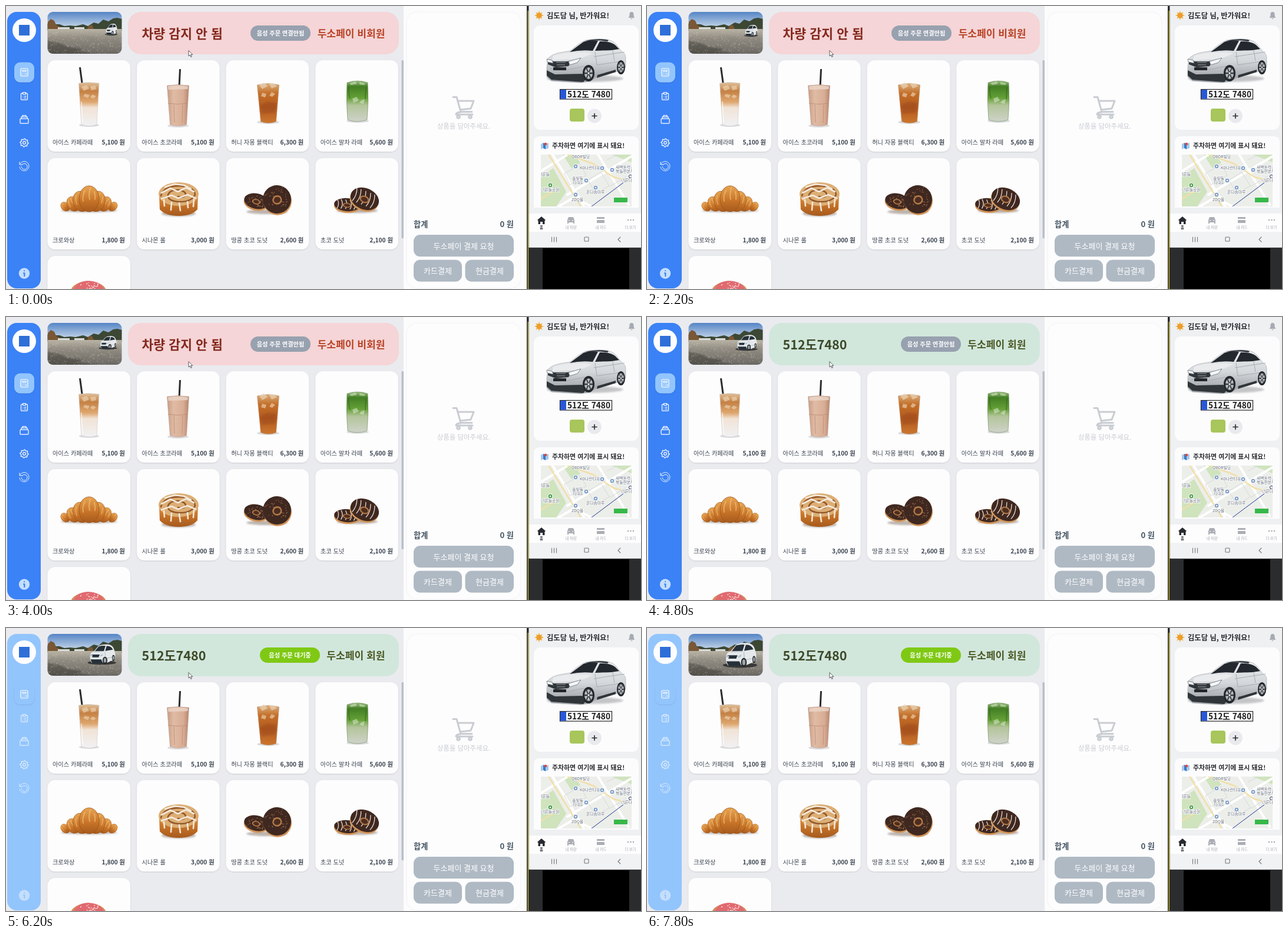
Write an HTML page that moves like this. It is 1078 px wide and 480 px high and loops after 8 s.

```html
<!DOCTYPE html>
<html lang="ko">
<head>
<meta charset="utf-8">
<title>주문 화면</title>
<style>
html, body { margin: 0; width: 100%; height: 100%; overflow: hidden; background: #eaebef; }
svg { display: block; width: 100%; height: 100%; }
text { font-family: "Noto Sans CJK KR", "Noto Sans CJK", sans-serif; white-space: pre; }
.b { font-weight: 700; }
.m { font-weight: 500; }
.mid { text-anchor: middle; }
.end { text-anchor: end; }
.line { fill: none; stroke-linecap: round; stroke-linejoin: round; }
</style>
</head>
<body>
<svg viewBox="0 0 1078 480">
<defs>
  <filter id="shadow" x="-20%" y="-20%" width="140%" height="140%"><feDropShadow dx="0" dy="1" stdDeviation="1" flood-opacity=".13"/></filter>
  <filter id="soft"><feGaussianBlur stdDeviation="1.5"/></filter>
  <linearGradient id="sky" x2="0" y2="1"><stop stop-color="#5585c6"/><stop offset="1" stop-color="#d3e0ec"/></linearGradient>
  <linearGradient id="ground" x2="0" y2="1"><stop stop-color="#bab4a6"/><stop offset=".35" stop-color="#918c82"/><stop offset="1" stop-color="#6a6762"/></linearGradient>
  <linearGradient id="latte" x2="0" y2="1"><stop stop-color="#dfc09b"/><stop offset=".2" stop-color="#c58144"/><stop offset=".45" stop-color="#dea76f"/><stop offset=".58" stop-color="#f1e3d6"/><stop offset="1" stop-color="#f1f1f4"/></linearGradient>
  <linearGradient id="choco"><stop stop-color="#c69c86"/><stop offset=".3" stop-color="#e0bba4"/><stop offset=".75" stop-color="#d8ad95"/><stop offset="1" stop-color="#b4846c"/></linearGradient>
  <linearGradient id="tea" x2="0" y2="1"><stop stop-color="#d9ab7b"/><stop offset=".25" stop-color="#c4702a"/><stop offset=".6" stop-color="#b4591e"/><stop offset="1" stop-color="#cb762e"/></linearGradient>
  <linearGradient id="matcha" x2="0" y2="1"><stop stop-color="#9cbf80"/><stop offset=".14" stop-color="#437f25"/><stop offset=".42" stop-color="#64a036"/><stop offset=".6" stop-color="#b3c49a"/><stop offset="1" stop-color="#cfd3ca"/></linearGradient>
  <linearGradient id="crust" x2="0" y2="1"><stop stop-color="#e7a552"/><stop offset=".55" stop-color="#c97529"/><stop offset="1" stop-color="#a65a1d"/></linearGradient>
  <linearGradient id="metal" x2="0" y2="1"><stop stop-color="#e9ebed"/><stop offset=".5" stop-color="#d5d8db"/><stop offset="1" stop-color="#92979d"/></linearGradient>
  <clipPath id="photoClip"><rect x="70.5" y="10" width="126" height="71" rx="9"/></clipPath>
  <clipPath id="mapClip"><rect x="908" y="252" width="154" height="88"/></clipPath>
</defs>

<!-- Sidebar -->
<rect id="sidebar" x="2" y="10" width="57" height="469" rx="16"/>
<circle cx="31" cy="41" r="20" fill="#fdfdfe"/>
<rect x="22" y="32" width="18" height="18" fill="#2f6fd8"/>
<rect x="14" y="95.500" width="34" height="34" rx="10" fill="#93c5fd" filter="url(#shadow)"/>
<g class="line" stroke="#fff" stroke-width="1.2">
  <path d="M26.500 106h9q1.500 0 1.500 1.500v10q0 1.500-1.500 1.500h-9q-1.500 0-1.500-1.500v-10q0-1.500 1.500-1.500M28 109h6v2h-6z"/>
  <path d="M28 114h.1M31 114h.1M34 114h.1M28 116.500h.1M31 116.500h.1M34 114v2.500"/>
</g>
<g id="icons" class="line" stroke="#fff" stroke-width="1.25">
  <path d="M28 148h-1.500q-1 0-1 1v9q0 1 1 1h9q1 0 1-1v-9q0-1-1-1H34M28.500 146.500h5v3h-5zM28.500 153h.1M31 153h3M28.500 156h.1M31 156h3"/>
  <path d="M25 191h12q1 0 1 1v6q0 1-1 1H25q-1 0-1-1v-6q0-1 1-1M26 191v-3h10v3M28 188v-2.500h6v2.500"/>
  <path id="gear"/><circle cx="31" cy="232" r="2.300"/>
  <path stroke-width=".9" d="M23 264.500v4.500h4.500M23.500 268.500a8 8 0 1 1-.5 4.500M27 269.500a5 5 0 1 1-.8 3"/>
</g>
<circle cx="31" cy="453.500" r="9.200" fill="#c5defc"/>
<path id="info" class="line" stroke-width="2.200" d="M31 449h.1M30 453h1.300v5"/>

<!-- Camera view -->
<g clip-path="url(#photoClip)">
  <path fill="url(#sky)" d="M70 10h127v30H70z"/>
  <path fill="#3c4734" d="M70 30l5-3 7 4 9 0 8 3 10-1 9 1 13-3 8 3 10-6 8 2 8-7 9 3 8-5 7-1 8 2v20H70z"/>
  <path fill="#7a5735" d="M71 39V27l5-5 6 3 3 7 6 3v5zM138 39l2-6 6-1 3 7z"/>
  <path fill="#d9dcda" d="M88 36h20v3H88zM116 36h17v3h-17z"/>
  <path fill="url(#ground)" d="M70 39h127v43H70z"/>
  <path fill="#34342f" opacity=".45" filter="url(#soft)" d="M70 59l24 5 9 5 28 4-10 4 38 6H70z"/>
  <path id="gravel" class="line" stroke="#d6cebd" stroke-width=".8" opacity=".55"/>
  <g id="car">
    <ellipse cx="48" cy="91" rx="54" ry="10" fill="#242526" opacity=".8"/>
    <path fill="#e6e9eb" d="M4 55q2-13 14-17l16-24q11-10 38-9 18 3 23 25l4 20-1 25-10 5-18 10-60 2-6-12z"/>
    <path fill="#263039" d="M22 37l14-22q14-5 26-3l-6 24zM61 36l5-23q16-3 24 17zM8 53h32l-4 13H12zM5 76h41l6 17H12z"/>
    <path fill="#b5c7d2" d="M4 52l9 3 1 8-9-3zM42 55l12-6-3 10-10 4z"/>
    <path fill="none" stroke="#aab2b8" stroke-width="2" d="M18 40l38-2M60 40l2 32 28-8"/>
    <g fill="#22272b"><ellipse cx="60" cy="80" rx="9" ry="17"/><ellipse cx="92" cy="69" rx="5" ry="14"/></g>
    <g fill="#9da5aa"><ellipse cx="60" cy="80" rx="5" ry="11"/><ellipse cx="92" cy="69" rx="3" ry="9"/></g>
  </g>
</g>

<!-- Status banner -->
<rect id="banner" x="207" y="10" width="460" height="72" rx="22"/>
<text id="plate" class="b" x="230.500" y="54.500" font-size="21.600"/>
<rect id="pill" y="33" width="102" height="26" rx="13"/>
<text id="voice" class="b mid" y="50" font-size="10.200" fill="#fff"/>
<text id="member" class="b end" x="643.500" y="53" font-size="17.100"/>

<g id="cards"></g>
<rect x="671.500" y="92" width="3.500" height="302" rx="1" fill="#b9bfc8"/>

<!-- Drinks -->
<g>
  <g fill="#c8c8cc" opacity=".65"><ellipse cx="141" cy="202" rx="17" ry="3"/><ellipse cx="292" cy="203" rx="18" ry="3"/><ellipse cx="445" cy="197" rx="19" ry="3"/><ellipse cx="597" cy="195" rx="19" ry="3"/></g>
  <path fill="none" stroke="#2b2a2c" stroke-width="3" d="M125.500 104l4.500 33M295.500 107l-1.500 30"/>
  <path fill="url(#latte)" stroke="#cfcac6" stroke-width=".6" d="M123.500 131q17-3 34.500 0l-4 70q-13 5-26 0z"/>
  <path fill="#efd8bb" opacity=".6" d="M128 137l9-3 4 6-9 4zM143 136l9-1 1 6-8 2zM134 149l8 2-3 5-8-3zM147 150l6 3-5 4-5-3z"/>
  <path fill="none" stroke="#fff" stroke-width="1.500" opacity=".7" d="M128 162l2 36"/>
  <path fill="url(#choco)" stroke="#c0a093" stroke-width=".6" d="M273.500 135q18-3 37 0l-4 66q-14 5-28 0z"/>
  <path fill="#ecd8cb" opacity=".8" d="M275 136q17-2 34 0l-.5 5-33 1z"/>
  <path fill="none" stroke="#b98470" opacity=".7" d="M275 165q17 3 33 0M285 167l1 31M300 167l-1 31"/>
  <path fill="url(#tea)" stroke="#b58a62" stroke-width=".6" d="M426.500 134q19-5 37 0l-5 62q-13 5-26 0z"/>
  <path fill="#efdcc1" opacity=".6" d="M430 134l8-5 6 7-9 5zM446 130l9 1 5 5-9 4zM435 147l7 2-2 6-7-2zM451 146l6 3-5 5-5-2z"/>
  <path fill="#8f431d" opacity=".35" filter="url(#soft)" d="M432 168l12-6 15 2-2 17-23 2z"/>
  <path fill="url(#matcha)" stroke="#6c8b5c" stroke-width=".6" d="M579 130q18-6 35 0 2 31-1 63-17 6-33 0-3-32-1-63z"/>
  <path fill="#e4ecd9" opacity=".5" d="M583 131l10-3 3 4-10 2zM600 129l10 2-2 3-8-1zM588 157l7-3 4 6-9 4zM603 160l6-2-2 8-7-2z"/>
  <path fill="none" stroke="#36601f" stroke-width="2" opacity=".5" d="M582 137q-1 10 2 20M611 138l-1 20"/>
</g>

<!-- Bakery -->
<g>
  <g fill="#6d5a4c" opacity=".45" filter="url(#soft)"><ellipse cx="141" cy="347" rx="48" ry="3"/><ellipse cx="293" cy="352" rx="29" ry="5"/><ellipse cx="443" cy="349" rx="35" ry="4"/><ellipse cx="596" cy="347" rx="35" ry="4"/></g>
  <g id="croissant"></g>
  <path fill="url(#crust)" d="M260 320q33-20 66 0l-1 25q-10 11-32 11t-32-11z"/>
  <ellipse cx="293" cy="319" rx="34" ry="20" fill="#dcae74"/>
  <path class="line" stroke="#925629" stroke-width="2.500" d="M263 322q4-16 30-17 27 1 28 15-6 13-29 12-19-2-17-12 4-9 18-8 13 2 12 9-5 5-13 2"/>
  <path class="line" stroke="#f4e9dc" stroke-width="2.600" d="M270 307l16-5 16 2 12 6M264 317l15-8 13 6 14-7 13 7M264 327l17-6 11 5 16-6 14 6M268 329l1 10M281 333l-1 13M294 334l2 13M308 332l1 10M319 328l-1 12"/>
  <g id="donuts"></g>
  <ellipse cx="140" cy="484" rx="30" ry="17" fill="#d88b5e"/>
  <path fill="#e06a70" d="M114 484q5-18 26-18 23 1 27 18z"/>
  <path id="pinkSprinkles" class="line" stroke="#fbd9d9" stroke-width="1.400"/>
</g>

<!-- Order panel -->
<path fill="#fcfcfd" d="M675 0h209.500v480H675z"/>
<rect x="680" y="10" width="194" height="469" rx="18" fill="#fdfdfe" stroke="#f3f3f6"/>
<g class="line" stroke="#c9cdd2" stroke-width="3"><path d="M759 154.500h6l7 25h19M767 161h27l-5 13-18 2M772 180q-8 0-8 4h28"/><circle cx="768" cy="188" r="2.300"/><circle cx="788" cy="188" r="2.300"/></g>
<text class="mid" x="777" y="207.500" font-size="11.400" fill="#c7cbd0">상품을 담아주세요.</text>
<g class="b" font-size="13.200" fill="#445461"><text x="692" y="374.500">합계</text><text class="end" x="862" y="374.500">0 원</text></g>
<g fill="#afb9c3"><rect x="692" y="388" width="170" height="37" rx="11"/><rect x="692" y="430.500" width="82" height="37" rx="11"/><rect x="779.500" y="430.500" width="82.500" height="37" rx="11"/></g>
<g class="m mid" font-size="13" fill="#fff"><text x="777" y="411.500">두소페이 결제 요청</text><text x="733" y="454">카드결제</text><text x="821" y="454">현금결제</text></g>

<!-- Phone -->
<path fill="#2b2c2e" d="M884 0H1078v480H884z"/>
<path fill="#c9b82a" d="M885.700 8h1.300v472h-1.300z"/>
<path fill="#000" d="M911 411h147v69H911z"/>
<path fill="#eef0f2" d="M887.500 0H1078v409.500H887.500z"/>
<path class="line" stroke="#f0bd5b" stroke-width="1.800" d="M905 9.500v13M898.500 16h13M900.500 11.500l9 9M909.500 11.500l-9 9"/>
<circle cx="905" cy="16" r="4.800" fill="#ed9d2d"/>
<text class="b" x="918" y="20.500" font-size="12.300" fill="#272a2e">김도담 님, 반가워요!</text>
<path fill="#a6abb1" d="M1056.500 20q2-1.500 2-6 0-4 3.500-4t3.500 4q0 4.500 2 6zM1060 21h4q-2 2.500-4 0z"/>
<g fill="#fcfcfd"><rect x="896" y="33" width="178" height="177" rx="11"/><path d="M896 342V231q0-10 10-10h158q10 0 10 10v111z"/></g>

<!-- Registered car -->
<ellipse cx="983" cy="123" rx="65" ry="6" fill="#9fa1a4" opacity=".6" filter="url(#soft)"/>
<path fill="url(#metal)" stroke="#a3a8ad" stroke-width=".6" d="M918 103l2-14q6-7 20-10l18-3q14-13 26-18 20-4 38-1 9 2 14 8l10 13q6 3 6 9v16l-4 6-10 2-36 10-10 6-16 3-50-3-8-7z"/>
<path fill="#23282e" d="M957 78l23-17q10-4 25-2l-9 17q-20-2-39 2zM1000 76l8-16q17-1 26 6l7 7-13 2zM983 59q24-5 40-1l-2 2q-18-3-38-1z"/>
<path fill="#e9ebed" d="M929 84q17-5 32-5 20-2 34 1-13 8-28 10l-40 2z"/>
<path fill="#30353a" d="M920 91l10 3h22l8-1-5 9-22 2-13-5zM918 109l14 7 46-1 8 7-6 7-54-4-8-7zM1004 117l31-9v4l-32 10z"/>
<path fill="#f4f6f8" stroke="#697077" stroke-width=".8" d="M918 90l9 2 2 5-10-2zM955 94l21-6-6 8-13 4z"/>
<path fill="none" stroke="#a5abb0" d="M1000 78l3 22 40-6M1030 76l3 17M998 86l52-8M924 106l30 2 28-6"/>
<path fill="#777d83" d="M934 95h16v1.500h-16zM935 99h14v1.500h-14z"/>
<path fill="#22272b" d="M929 104h22v5h-22z"/>
<g id="wheels"></g>

<rect x="940.500" y="141.500" width="88" height="16.500" fill="#fff" stroke="#222" stroke-width="1.200"/>
<path fill="#2858d8" d="M941 142h10v15.500h-10z"/>
<text class="b mid" x="989.500" y="154.500" font-size="13.700" fill="#191919">512도 7480</text>
<rect x="957" y="174" width="25" height="22" rx="4" fill="#a8c65b"/>
<circle cx="999" cy="186.500" r="12" fill="#e8eaed"/>
<path class="line" stroke="#282a2d" stroke-width="1.600" d="M995 186.500h8M999 182.500v8"/>

<!-- Parking map -->
<path fill="#a9c8e8" d="M908 234l4-2 4 2 5-2v9l-5 2-4-2-4 2z"/><path fill="#367ac7" d="M912 232l4 2v9l-4-2z"/><circle cx="916" cy="234" r="2.300" fill="#d94a43"/>
<text class="b" x="927" y="241" font-size="10.900" fill="#292b2f">주차하면 여기에 표시 돼요!</text>
<g clip-path="url(#mapClip)">
  <path fill="#eceeea" d="M908 252h154v88H908z"/>
  <path fill="#cfe3bd" d="M908 290l21-15 22 40-17 25h-26zM945 252h20l10 14-15 9zM1028 252h34v13z"/>
  <path class="line" stroke="#fff" stroke-width="4" d="M928 252l56 92M905 282l50-31M953 320l112-67M1004 250l53 87M938 340l26-15 60 30"/>
  <path class="line" stroke="#f2dfa7" stroke-width="2.500" d="M920 250l57 92M949 250l49 18 33 22 32 8M908 327l28-17"/>
  <path class="line" stroke="#d6d9d9" stroke-width="1" d="M948 284l27-15 10 18-27 16zM988 295l22-13 14 23-22 13zM1020 261l27-13M1025 306l28-17"/>
  <path class="line" stroke="#24358f" d="M994 340l67-50"/>
  <circle cx="1060" cy="289" r="2.500" fill="#fff" stroke="#293263"/>
  <g id="mapPins"></g>
  <g id="mapNames" font-size="6.800" fill="#626c78"></g>
  <path fill="#37b84a" d="M1032 325h23v8h-23z"/>
</g>

<!-- Phone navigation -->
<path fill="#fdfdfe" d="M888 352h190v31H888z"/>
<path fill="#f1f2f3" d="M888 383h190v26.500H888z"/>
<path fill="#282b30" d="M902 363l7-6 7 6-1.500 1v6h-3.500v-4h-4v4h-3.500v-6z"/>
<g fill="#aaaeb4"><path d="M953 363l2-5h8l2 5v6h-2v-2h-8v2h-2zM1003 358h13v10h-13z"/><circle cx="1056" cy="363" r="1.300"/><circle cx="1060.500" cy="363" r="1.300"/><circle cx="1065" cy="363" r="1.300"/></g>
<path fill="#fff" d="M1003 361h13v2h-13zM955 363h1.500v1.500H955zM961.500 363h1.500v1.500h-1.500z"/>
<g class="mid" font-size="6.300" fill="#a4a8ad"><text class="b" x="909" y="378" fill="#292c31">홈</text><text x="959" y="378">내 차량</text><text x="1010" y="378">내 카드</text><text x="1060" y="378">더 보기</text></g>
<path class="line" stroke="#73777c" stroke-width="1.100" d="M926.500 392v8M930.500 392v8M934.500 392v8M983 392h5q1 0 1 1v5q0 1-1 1h-5q-1 0-1-1v-5q0-1 1-1M1043 392l-4 4 4 4"/>

<path fill="#fff" stroke="#33363a" stroke-width=".8" d="M310 75.500v9.500l2.200-2 1.600 3.500 1.600-.8-1.600-3.300h3z"/>
</svg>

<script>
const el = id => document.getElementById(id);
const set = (id, attrs) => Object.entries(attrs).forEach(([k, v]) => el(id).setAttribute(k, v));

let seed = 7;
const random = () => (seed = seed * 16807 % 2147483647) / 2147483647;

function specks(count, x, y, w, h, length) {
  return Array.from({ length: count }, () =>
    `M${x + random() * w} ${y + random() * h}l${(random() - .5) * length} ${(random() - .5) * length}`).join("");
}

const products = [
  ["아이스 카페라떼", "5,100"], ["아이스 초코라떼", "5,100"], ["허니 자몽 블랙티", "6,300"], ["아이스 말차 라떼", "5,600"],
  ["크로와상", "1,800"], ["시나몬 롤", "3,000"], ["땅콩 초코 도넛", "2,600"], ["초코 도넛", "2,100"], ["", ""]
];
el("cards").innerHTML = products.map(([name, price], i) => {
  const x = 70.5 + i % 4 * 151.6, y = 92 + Math.floor(i / 4) * 166;
  return `<rect x="${x}" y="${y}" width="140.500" height="155" rx="13" fill="#fdfdfe" filter="url(#shadow)"/>` + (name &&
    `<g font-size="10.200" fill="#39424d"><text x="${x + 8.5}" y="${y + 143}">${name}</text>
    <text class="b end" x="${x + 131.5}" y="${y + 143}">${price} 원</text></g>`);
}).join("");

// Folds overlap from both tips toward the middle.
el("croissant").innerHTML = [-3, 3, -2, 2, -1, 1, 0].map(k => {
  const size = 1 - Math.abs(k) * .2;
  return `<g transform="translate(${141 + k * 13.5} ${349 - 22 * size}) rotate(${k * 15}) scale(${size})">
    <ellipse rx="17" ry="22" fill="url(#crust)" stroke="#9a5219" stroke-width=".8"/>
    <path class="line" stroke="#f3c680" stroke-width="2" opacity=".6" d="M-7-14q-5 9-3 18M2-18q-3 10-1 19M9-12q2 7 1 13"/></g>`;
}).join("");

function donut(x, y, rx, ry, angle, decoration) {
  return `<g transform="translate(${x} ${y}) rotate(${angle})">
    <ellipse cy="3" rx="${rx}" ry="${ry - 2}" fill="#d09458"/>
    <ellipse rx="${rx}" ry="${ry - 2}" fill="#3f2820"/>
    <path class="line" stroke="${decoration.color}" stroke-width="${decoration.width}" d="${decoration.path(rx, ry)}"/>
    <ellipse cy="1" rx="${rx * .34}" ry="${ry * .3}" fill="#b37a48"/>
    <ellipse cy="1" rx="${rx * .24}" ry="${ry * .2}" fill="#4c2d20"/></g>`;
}
const nuts = { color: "#9b6a49", width: 1.1, path: (rx, ry) => specks(45, -rx * .7, -ry * .65, rx * 1.4, ry * 1.25, 2) };
const icing = { color: "#e9ddd5", width: 1.3, path: (rx, ry) =>
  [-.65, -.35, 0, .35, .65].map(k => `M${k * rx - 3} ${-ry * .62}q5 ${ry * .6} 1 ${ry * 1.15}`).join("") };
el("donuts").innerHTML = donut(425, 331, 21, 15, 12, nuts) + donut(460, 328, 24, 26, -20, nuts)
  + donut(579, 337, 22, 13, 5, icing) + donut(609, 327, 25, 20, 22, icing);

set("gravel", { d: specks(200, 70, 42, 127, 39, 3) });
set("pinkSprinkles", { d: specks(16, 123, 469, 34, 10, 4) });
set("gear", { d: Array.from({ length: 32 }, (_, i) => {
  const a = i * Math.PI / 16, r = i % 4 < 2 ? 7 : 5.4;
  return (i ? "L" : "M") + (31 + r * Math.cos(a)) + " " + (232 + r * Math.sin(a));
}).join("") + "z" });

el("wheels").innerHTML = [[989, 114, 10, 14], [1044, 104, 7, 12]].map(([x, y, rx, ry]) =>
  `<g transform="translate(${x} ${y}) scale(${rx / 10} ${ry / 10})"><circle r="10" fill="#25292d"/><circle r="7" fill="#b9bfc4"/>
  <path stroke="#343a3f" stroke-width="1.700" d="M-7 0H7M-3.500-6l7 12M3.500-6l-7 12"/><circle r="1.500" fill="#e1e4e6"/></g>`).join("");

el("mapPins").innerHTML = [[1012, 275], [1029, 278], [985, 296], [1001, 308], [967, 320], [967, 272], [924, 304, "#4a9d4b"]]
  .map(([x, y, color = "#7f9fc8"]) => `<circle cx="${x}" cy="${y}" r="4" fill="${color}" stroke="#fff"/><circle cx="${x}" cy="${y}" r="1.300" fill="#fff"/>`).join("");
el("mapNames").innerHTML = [
  ["QBDR빌딩", 960, 258], ["KD나란타워", 974, 277], ["너른들", 904, 288], ["새벽동력공", 1035, 276], ["북들판본부", 1035, 283],
  ["솔빛둘", 961, 295], ["타워1", 963, 302], ["너른들공원", 908, 314], ["온다솜마루", 985, 318], ["ZDQ몰", 960, 331], ["너른나", 1044, 298]
].map(([name, x, y]) => `<text x="${x}" y="${y}" stroke="#fff" stroke-width="1.500" paint-order="stroke">${name}</text>`).join("");

// time, left, top, right, bottom
const approach = [
  [0, 169, 29, 189, 50], [2200, 166, 31, 188, 52], [4000, 159, 31, 188, 55], [4800, 152, 29, 187, 57],
  [5400, 145, 27, 186, 60], [7000, 137, 25, 186, 64], [7800, 132, 23, 186, 67]
];
function carBox(t) {
  const i = Math.max(1, approach.findIndex(key => key[0] >= t));
  const [a, b] = [approach[i - 1], approach[i]], k = (t - a[0]) / (b[0] - a[0]);
  return a.slice(1).map((v, n) => v + (b[n + 1] - v) * k);
}

function draw(now) {
  const t = Math.floor(now % 8000 / 200) * 200;
  const detected = t >= 4400, ready = t >= 5200;
  const [left, top, right, bottom] = carBox(t);
  set("car", { transform: `translate(${left} ${top}) scale(${(right - left) / 100} ${(bottom - top) / 100})` });
  set("banner", { fill: detected ? "#d2e7dc" : "#f5d5d7" });
  set("plate", { fill: detected ? "#3d4828" : "#84291e" });
  set("member", { fill: detected ? "#4b5824" : "#b84325" });
  set("pill", { x: detected ? 431 : 415, fill: ready ? "#7fc914" : "#98a1af" });
  set("voice", { x: detected ? 482 : 466 });
  set("sidebar", { fill: ready ? "#93c5fd" : "#3b82f6" });
  set("icons", { opacity: ready ? .7 : 1 });
  set("info", { stroke: ready ? "#93c5fd" : "#3b82f6" });
  el("plate").textContent = detected ? "512도7480" : "차량 감지 안 됨";
  el("member").textContent = detected ? "두소페이 회원" : "두소페이 비회원";
  el("voice").textContent = ready ? "음성 주문 대기중" : "음성 주문 연결안됨";
  requestAnimationFrame(draw);
}
draw(performance.now());
</script>
</body>
</html>
```
